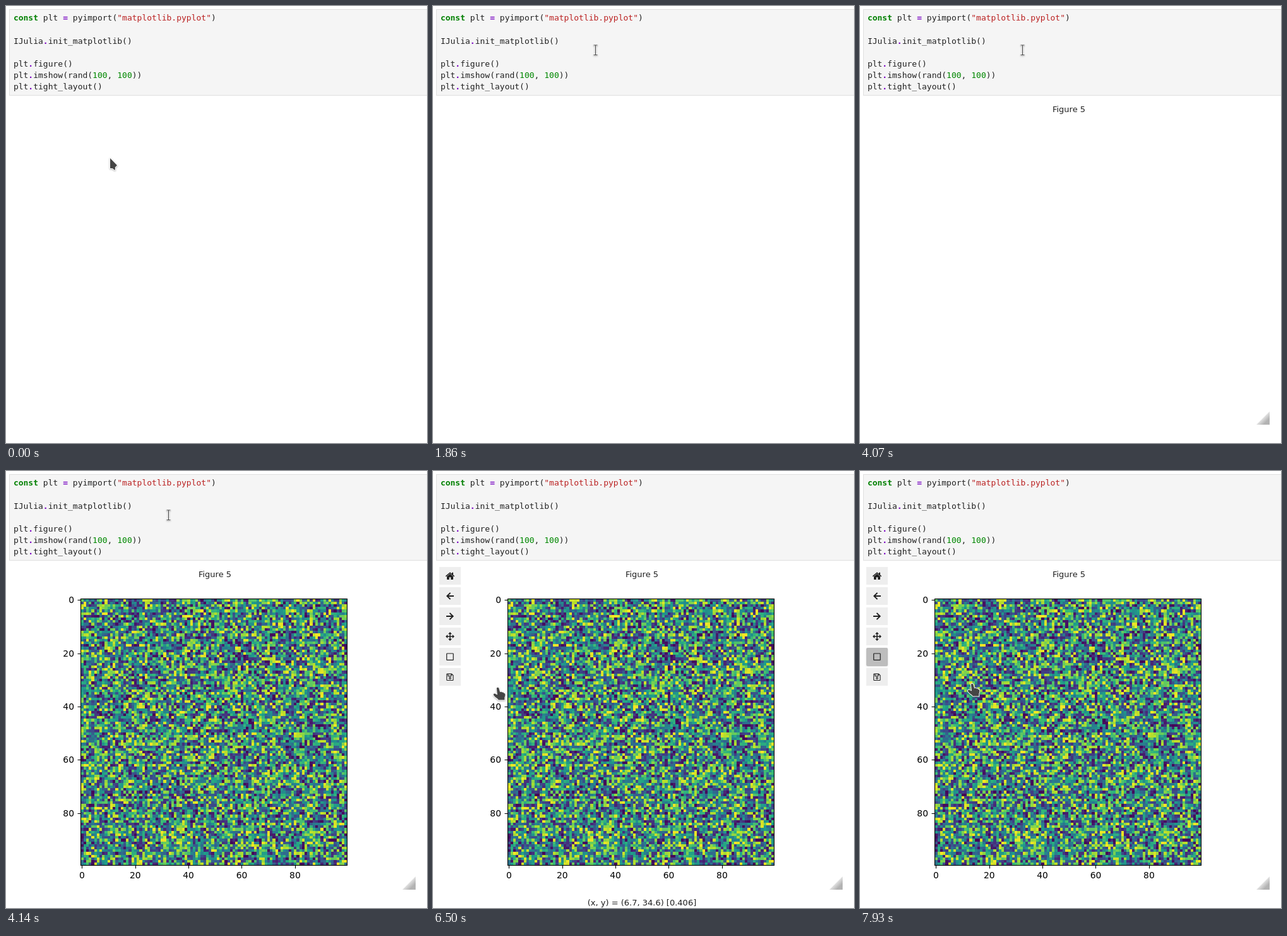
Recreate the animation shown at these times as an HTML page with a canvas. Size 667x692 px, loop 8 s.

```html
<!DOCTYPE html>
<html lang="en">
<head>
<meta charset="utf-8">
<title>Interactive plot in a notebook</title>
<style>
html, body { margin: 0; width: 100%; height: 100%; overflow: hidden; background: #fff; }
#cell {
  position: absolute; left: 5px; right: 0; top: 5px; height: 137px;
  box-sizing: border-box; border: 1px solid #e0e0e0; border-right: 0; background: #f5f5f5;
}
#cell.edit { border-color: #1976d2; background: #fff; box-shadow: inset 0 0 2px #64b5f6; }
pre {
  position: absolute; left: 11.88px; top: 10.1px; margin: 0; color: #212121;
  font: 13px/18.2px "DejaVu Sans Mono", monospace;
}
pre b { color: #008000; }
pre i { color: #7800c2; font-style: normal; font-weight: bold; }
pre u { color: #008800; text-decoration: none; }
pre s { color: #ba2121; text-decoration: none; }
#caret { position: absolute; left: 11px; top: 65px; width: 1px; height: 17px; background: #000; }
canvas, svg { position: absolute; left: 0; top: 0; width: 100%; height: 100%; overflow: hidden; }
.label { font: 13px "DejaVu Sans", sans-serif; fill: #212121; text-anchor: middle; }
.tick { font: 13.89px "DejaVu Sans", sans-serif; fill: #000; }
.icon { fill: #1f1f1f; }
.line { fill: none; stroke: #1f1f1f; }
.pointer { filter: drop-shadow(0 1px 1px rgba(0, 0, 0, .3)); }
.pointer path { fill: #454545; stroke: #fff; stroke-width: 2; stroke-linejoin: round; paint-order: stroke; }
#zoom.hover { filter: drop-shadow(0 1px .5px rgba(0, 0, 0, .2)) drop-shadow(0 1px 1.5px rgba(0, 0, 0, .14)); }
#zoom.active { fill: #bdbdbd; }
</style>
</head>
<body>
<div id="cell"></div>
<pre><b>const</b> plt <i>=</i> pyimport(<s>"matplotlib.pyplot"</s>)

IJulia<i>.</i>init_matplotlib()

plt<i>.</i>figure()
plt<i>.</i>imshow(rand(<u>100</u>, <u>100</u>))
plt<i>.</i>tight_layout()</pre>
<div id="caret"></div>
<canvas id="map" width="667" height="692"></canvas>
<svg viewBox="0 0 667 692">
  <defs>
    <linearGradient id="grip" gradientUnits="userSpaceOnUse" x1="635" y1="649" x2="644" y2="658">
      <stop offset="0" stop-color="#fff"/><stop offset="1" stop-color="#b3b3b3"/>
    </linearGradient>
  </defs>
  <g id="figure">
    <text class="label" x="331" y="168">Figure 5</text>
    <path d="M628 663H649V642Z" fill="url(#grip)"/>
  </g>
  <g id="axes">
    <rect x="118.5" y="202.5" width="422" height="422" fill="none" stroke="#000" stroke-width="1.1"/>
  </g>
  <text class="label" id="coords" x="331" y="688"></text>
  <g id="tools">
    <g id="buttons" fill="#eee"></g>
    <path class="icon" d="M27 162.8L32 167V171.2Q32 172 31.2 172H28.3V168.3H25.7V172H22.8Q22 172 22 171.2V167Z"/>
    <path class="line" stroke-width="1.5" d="M20.3 166.8L27 161.2L33.7 166.8"/>
    <path class="icon" d="M30 160.7H32V165L30 163.3Z"/>
    <path class="line" stroke-width="1.9" d="M33 198H22.5M27.5 192.8L22.3 198L27.5 203.2"/>
    <path class="line" stroke-width="1.9" d="M21 230H31.5M26.5 224.8L31.7 230L26.5 235.2"/>
    <path class="line" stroke-width="1.5" d="M22 262H32M27 257V267"/>
    <path class="icon" d="M27 255l3 3.2h-6zM27 269l3-3.2h-6zM20 262l3.2-3v6zM34 262l-3.2-3v6z"/>
    <rect class="line" x="21.7" y="289" width="10.5" height="10.4" rx=".7" stroke-width="1.2"/>
    <path class="line" stroke-width="1.1" d="M22.5 321.4H29.6L32 323.8V330.8Q32 331.5 31.3 331.5H22.5Q21.8 331.5 21.8 330.8V322.1Q21.8 321.4 22.5 321.4ZM23.8 321.4V324.6H29V321.4"/>
    <circle class="line" cx="27" cy="328" r="1.4" stroke-width="1.1"/>
  </g>
  <g class="pointer" id="arrow"><path d="M0 0L11 11.3L7.8 14.5L8 18.5H6.8L3.6 16H0Z"/></g>
  <g class="pointer" id="beam"><path d="M-3 -7.5H-.5V7H-3V8H3V7H.5V-7.5H3V-8.5H-3Z" style="stroke-width:1"/></g>
  <g class="pointer" id="hand"><path d="M-2.2 1Q-.6 -1.2 1.2 .6L3.2 7.2L5 6.6L6.5 7.6L8.4 7.4L9.2 8.8L10.8 9.2Q11.6 10 11.3 13L10.4 15.5V19.5H.8L-.8 17.5Q-4.5 15.5 -7 12Q-7.6 9.3 -5 9.6L-1 11.6Z"/></g>
</svg>
<script>
const $ = id => document.getElementById(id);
const LOOP = 8000, STEP = 1000 / 14;
const LEFT = 118.5, TOP = 202.5, UNIT = 4.22, SIZE = 422;

// Pointer path: step, x, y
const path = [
  [14, 165, 241], [16, 170, 232], [18, 188, 199], [20, 217, 148], [22, 245, 98], [24, 258, 74],
  [25, 258, 74], [26, 258, 70], [75, 258, 70], [76, 257, 82], [77, 254, 118], [78, 249, 170],
  [79, 243, 231], [80, 236.66, 287.74], [81, 233, 321], [82, 230, 346], [86, 230, 346],
  [87, 224, 350], [88, 207, 353], [90, 148.88, 350.62], [91, 103, 343], [93, 67, 326],
  [96, 43, 307], [98, 37, 300], [99, 30, 293], [100, 26, 289], [109, 26, 289],
  [110, 75, 306], [111, 178, 337]
];

function locate(k) {
  if (k <= path[0][0]) return path[0].slice(1);
  const i = path.findIndex(p => p[0] >= k);
  const [a, ax, ay] = path[i - 1], [b, bx, by] = path[i];
  const f = (k - a) / (b - a);
  return [ax + (bx - ax) * f, ay + (by - ay) * f];
}

function add(parent, tag, attrs, text = "") {
  const el = document.createElementNS("http://www.w3.org/2000/svg", tag);
  for (const name in attrs) el.setAttribute(name, attrs[name]);
  el.textContent = text;
  parent.append(el);
  return el;
}

const viridis = ["440154", "482878", "3e4989", "31688e", "26828e", "1f9e89", "35b779", "6ece58", "b5de2b", "fde725"]
  .map(h => [0, 2, 4].map(i => parseInt(h.slice(i, i + 2), 16)));

function shade(v) {
  const p = v * 9, i = Math.min(8, Math.floor(p));
  return `rgb(${viridis[i].map((c, j) => Math.round(c + (viridis[i + 1][j] - c) * (p - i)))})`;
}

function drawMap() {
  const ctx = $("map").getContext("2d");
  let seed = 20;
  const rand = () => {
    seed = (seed + 0x6d2b79f5) | 0;
    let r = Math.imul(seed ^ (seed >>> 15), 1 | seed);
    r = (r + Math.imul(r ^ (r >>> 7), 61 | r)) ^ r;
    return ((r ^ (r >>> 14)) >>> 0) / 4294967296;
  };
  const edge = (start, i) => Math.round(start + i * UNIT);
  for (let r = 0; r < 100; r++) {
    for (let c = 0; c < 100; c++) {
      const x = edge(LEFT, c), y = edge(TOP, r);
      ctx.fillStyle = shade(rand());
      ctx.fillRect(x, y, edge(LEFT, c + 1) - x, edge(TOP, r + 1) - y);
    }
  }
}

function drawTicks() {
  const axes = $("axes");
  for (let v = 0; v < 100; v += 20) {
    const d = (v + 0.5) * UNIT, x = Math.floor(LEFT + d) + 0.5, y = Math.floor(TOP + d) + 0.5;
    add(axes, "path", { d: `M${x} 624.5v5M118.5 ${y}h-5`, stroke: "#000", "stroke-width": 1.1 });
    add(axes, "text", { class: "tick", x: LEFT + d - 0.3, y: 645, "text-anchor": "middle" }, v);
    add(axes, "text", { class: "tick", x: 108, y: y + 4.5, "text-anchor": "end" }, v);
  }
}

drawMap();
drawTicks();
for (let i = 0; i < 6; i++) {
  const b = add($("buttons"), "rect", { x: 10, y: 152 + 32 * i, width: 34, height: 28 });
  if (i === 4) b.id = "zoom";
}
const zoom = $("zoom");

const show = (id, on) => { $(id).style.visibility = on ? "visible" : "hidden"; };

function coordsText(k) {
  const [x, y] = locate(k - 1);
  const u = (x - LEFT) / UNIT, v = (y - TOP) / UNIT;
  if (k < 77 || k > 109 || Math.min(u, v) < 0 || Math.max(u, v) > SIZE / UNIT) return "";
  return `(x, y) = (${(u - 0.5).toFixed(1)}, ${(v - 0.5).toFixed(1)}) [0.406]`;
}

function render(time) {
  const k = Math.floor((time % LOOP) / STEP + 0.1) % 112;
  const editing = k >= 29 && k < 54;
  $("cell").classList.toggle("edit", editing);
  show("caret", editing && (k < 38 || k >= 47));
  show("figure", k >= 57);
  show("axes", k >= 58);
  show("map", k >= 58);
  $("tools").style.opacity = Math.max(0, Math.min(1, (k - 78.8) / 4.1));
  $("coords").textContent = coordsText(k);
  zoom.classList.toggle("hover", k >= 97);
  zoom.classList.toggle("active", k >= 105);
  zoom.setAttribute("rx", k >= 105 ? 2 : 0);

  const [x, y] = locate(k);
  const kind = y < 142 ? "beam" : k > 57 && y > 180 ? "hand" : "arrow";
  for (const id of ["arrow", "beam", "hand"]) {
    show(id, id === kind);
    $(id).setAttribute("transform", `translate(${id === "beam" ? x - 0.5 : x} ${y})`);
  }
}

const start = performance.now();
function loop() {
  render(performance.now() - start);
  requestAnimationFrame(loop);
}
loop();
</script>
</body>
</html>
```
